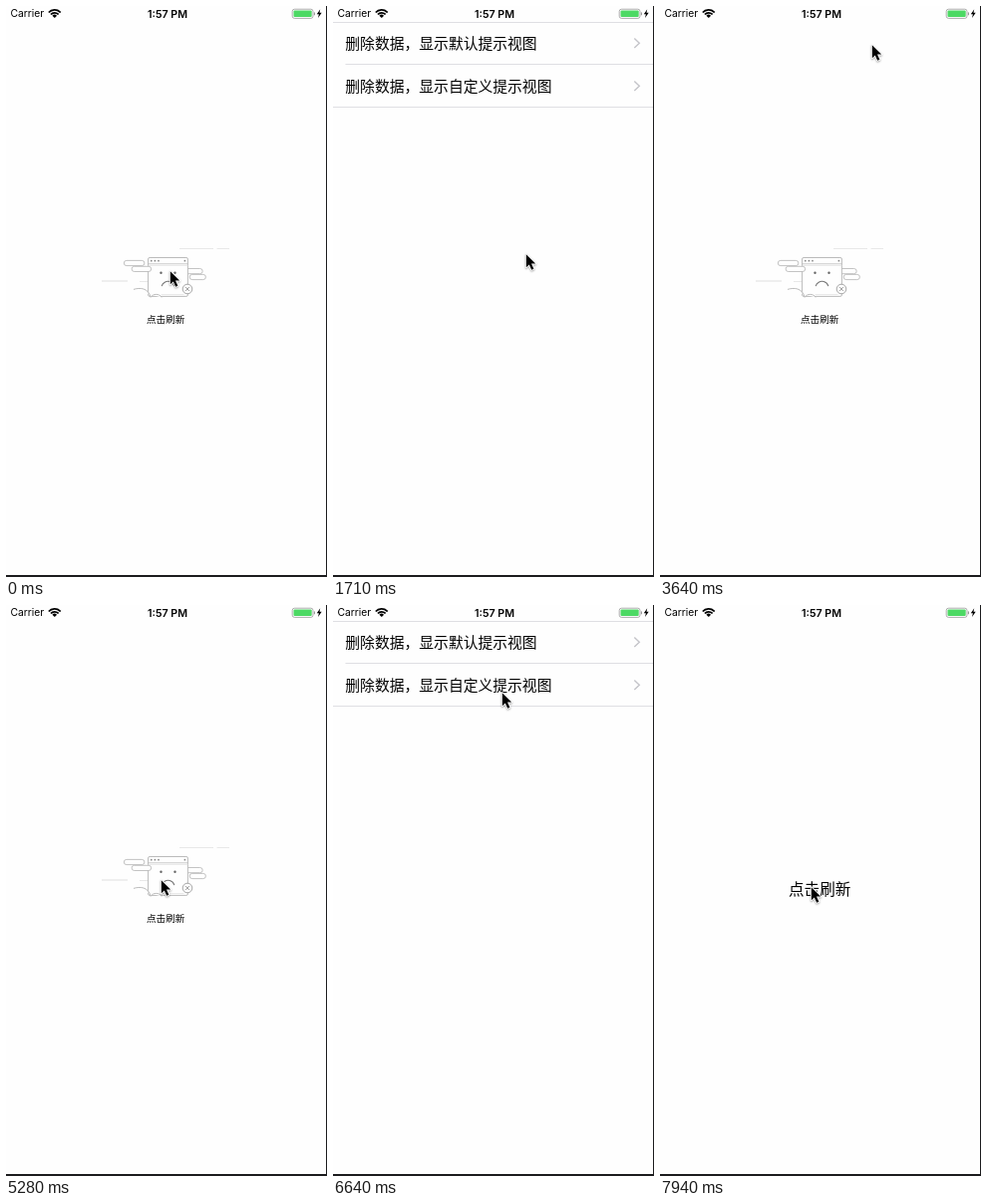
Animation of 322 by 573 pixels, one loop 8 s. Source, as an HTML page with a canvas:

```html
<!DOCTYPE html>
<html lang="zh-CN">
<head>
<meta charset="utf-8">
<title>Empty view</title>
<style>
  html, body { margin: 0; width: 100%; height: 100%; overflow: hidden; background: #fefefe; }
  canvas { display: block; width: 322px; height: 573px; }
</style>
</head>
<body>
<canvas id="stage"></canvas>
<script>
const W = 322, H = 573, LOOP = 8000, TICK = 58;
const PAPER = '#fefefe', GREY = '#b4b4b4', FAINT = '#e2e2e2';
const CJK = '"Noto Sans CJK SC", "Noto Sans CJK", sans-serif';
const LATIN = 'Inter, Roboto, sans-serif';

const canvas = document.getElementById('stage');
const ctx = canvas.getContext('2d');
const dpr = window.devicePixelRatio || 1;
canvas.width = W * dpr;
canvas.height = H * dpr;

// Each tap on the page swaps the screen
const screens = [
  { at: 0, paint: drawIllustration },
  { at: 950, paint: drawList },
  { at: 3640, paint: drawIllustration },
  { at: 5760, paint: drawList },
  { at: 7000, paint: drawLabel }
];

// The pointer curves from where it rests, bending towards `via`
const home = { x: 164, y: 266 };
const moves = [
  { at: 90, end: 710, via: { x: 148, y: 305 }, to: { x: 157, y: 283 } },
  { at: 1190, end: 1420, via: { x: 212, y: 272 }, to: { x: 194, y: 263 } },
  { at: 1710, end: 2230, via: { x: 182, y: 150 }, to: { x: 212, y: 39 } },
  { at: 3870, end: 4440, via: { x: 195, y: 150 }, to: { x: 154, y: 273 } },
  { at: 5280, end: 5460, via: { x: 156, y: 281 }, to: { x: 161, y: 284 } },
  { at: 6060, end: 6640, via: { x: 163, y: 180 }, to: { x: 169, y: 88 } },
  { at: 7240, end: 7940, via: { x: 212, y: 165 }, to: { x: 151, y: 283 } }
];

function pointerAt(t) {
  const i = moves.findLastIndex(m => m.at <= t);
  if (i < 0) return home;
  const { at, end, via, to } = moves[i];
  const from = i ? moves[i - 1].to : home;
  const gaps = Math.round((end - at) / TICK);
  const step = Math.floor((t - at) / (end - at) * gaps + 1e-6) + 1;
  const p = Math.min(1, step / (gaps + 1));
  const s = (p + p * p * (3 - 2 * p)) / 2;
  const bend = k => (1 - s) ** 2 * from[k] + 2 * s * (1 - s) * via[k] + s * s * to[k];
  return { x: bend('x'), y: bend('y') };
}

function text(str, x, y, font, align = 'left') {
  ctx.font = font;
  ctx.textAlign = align;
  ctx.fillStyle = '#000';
  ctx.fillText(str, x, y);
}

function rect(x, y, w, h, color) {
  ctx.fillStyle = color;
  ctx.fillRect(x, y, w, h);
}

function shape(path, fill, line, width = 0.8) {
  if (fill) {
    ctx.fillStyle = fill;
    ctx.fill(path);
  }
  if (line) {
    ctx.strokeStyle = line;
    ctx.lineWidth = width;
    ctx.stroke(path);
  }
}

function box(x, y, w, h, r) {
  const path = new Path2D();
  path.roundRect(x, y, w, h, r);
  return path;
}

function circle(x, y, r) {
  const path = new Path2D();
  path.arc(x, y, r, 0, Math.PI * 2);
  return path;
}

function fan(x, y, r, spread) {
  const path = new Path2D();
  path.arc(x, y, r, -Math.PI / 2 - spread, -Math.PI / 2 + spread);
  return path;
}

function drawWifi(x, y) {
  const spread = 0.83;
  for (const r of [5.2, 8.1]) shape(fan(x, y, r, spread), null, '#000', 1.75);
  const core = fan(x, y, 3.2, spread);
  core.lineTo(x, y);
  shape(core, '#000');
}

function drawStatusBar() {
  text('Carrier', 4.5, 11.4, '10.3px ' + LATIN);
  drawWifi(48.8, 12);
  text('1:57 PM', 162, 11.5, '600 10.7px ' + LATIN, 'center');
  shape(box(287.2, 3.2, 20.8, 9.2, 2.2), null, '#9a9a9a');
  shape(box(288.5, 4.5, 18.2, 6.6, 1), '#4cd964');
  shape(box(308.9, 6.3, 1.1, 3, 0.5), '#9a9a9a');
  shape(new Path2D('M315.2 3.2 l-3.4 5.1 h2.1 l-.9 3.7 l3.7 -5.2 h-2.2 Z'), '#000');
}

function drawList() {
  const rowHeight = 43, labels = ['删除数据，显示默认提示视图', '删除数据，显示自定义提示视图'];
  labels.forEach((label, i) => {
    const y = 37.2 + i * rowHeight;
    text(label, 12.3, y + 5.3, '350 14.8px ' + CJK);
    shape(new Path2D(`M302.3 ${y - 4.8} l5 4.8 l-5 4.8`), null, '#c4c4c9', 1.4);
  });
  for (let i = 0; i <= labels.length; i++) {
    const inset = i === 1 ? 12.5 : 0;
    rect(inset, Math.round(15.6 + i * 42.6), 321 - inset, 0.9, '#dcdce0');
  }
}

function drawCloud(x, y, w, shift) {
  const h = 5.2;
  shape(box(x, y, w, h, h / 2), PAPER, GREY);
  shape(box(x + shift, y + h + 0.7, w - 1, h, h / 2), PAPER, GREY);
}

function drawBrowser(x, y, size) {
  const mid = x + size / 2;
  shape(box(x, y, size, size - 0.9, 1.5), PAPER, GREY, 0.9);
  rect(x, y + 6, size, 0.7, GREY);
  rect(x, y + 7.8, size, 0.7, FAINT);
  rect(x + 13, y + 36.7, size - 17, 0.7, FAINT);
  for (const dx of [3.2, 6.8, 10.4, size - 3]) shape(circle(x + dx, y + 3.2, 0.85), '#858585');
  for (const side of [-1, 1]) shape(circle(mid + side * 7, y + 15.3, 1.2), '#666');
  shape(fan(mid, y + 30.4, 6.6, 1.3), null, '#777', 1.1);
}

function drawBadge(x, y) {
  shape(circle(x, y, 4.8), PAPER, '#9c9c9c', 0.9);
  shape(new Path2D(`M${x - 2} ${y - 2} l4 4 m0 -4 l-4 4`), null, '#9c9c9c', 0.9);
}

function drawIllustration() {
  shape(new Path2D('M174 243.5 h34 m3.5 0 h12.5 M134 276.5 h9'), null, FAINT);
  rect(96, 275.6, 26, 0.8, '#d4d4d4');
  drawCloud(180, 263.5, 17.2, 4.2);
  drawBrowser(142.6, 252.5, 39.8);
  drawCloud(118.3, 255.4, 20.6, 7.8);
  shape(new Path2D('M128 284.4 c6 -1.9 14.5 -1.9 17.2 7.9 c1.8 -3.7 8.8 -4.1 10.8 .1'), PAPER, GREY, 0.9);
  drawBadge(182, 284);
  text('点击刷新', 160.2, 317.9, '9.6px ' + CJK, 'center');
}

function drawLabel() {
  text('点击刷新', 160.2, 290.8, '350 15.6px ' + CJK, 'center');
}

const arrow = new Path2D('M0 0 v13 l3 -2.8 l2.4 5.3 l2.2 -1 l-2.4 -5.1 h4.2 Z');

function drawPointer({ x, y }) {
  ctx.save();
  ctx.translate(Math.round(x) + 0.8, Math.round(y) + 0.2);
  ctx.lineJoin = 'round';
  ctx.shadowColor = 'rgba(0,0,0,0.35)';
  ctx.shadowBlur = 2 * dpr;
  ctx.shadowOffsetY = dpr;
  shape(arrow, null, '#fff', 1.8);
  ctx.shadowColor = 'transparent';
  shape(arrow, '#000');
  ctx.restore();
}

function draw(t) {
  ctx.setTransform(dpr, 0, 0, dpr, 0, 0);
  rect(0, 0, W, H, PAPER);
  drawStatusBar();
  screens.findLast(s => s.at <= t).paint();
  rect(321, 0, 1, H, '#1c1c1e');
  rect(0, 571, W, 2, '#1c1c1e');
  drawPointer(pointerAt(t));
}

const began = performance.now();
function tick() {
  draw(Math.max(0, performance.now() - began) % LOOP);
  requestAnimationFrame(tick);
}
tick();
</script>
</body>
</html>
```
